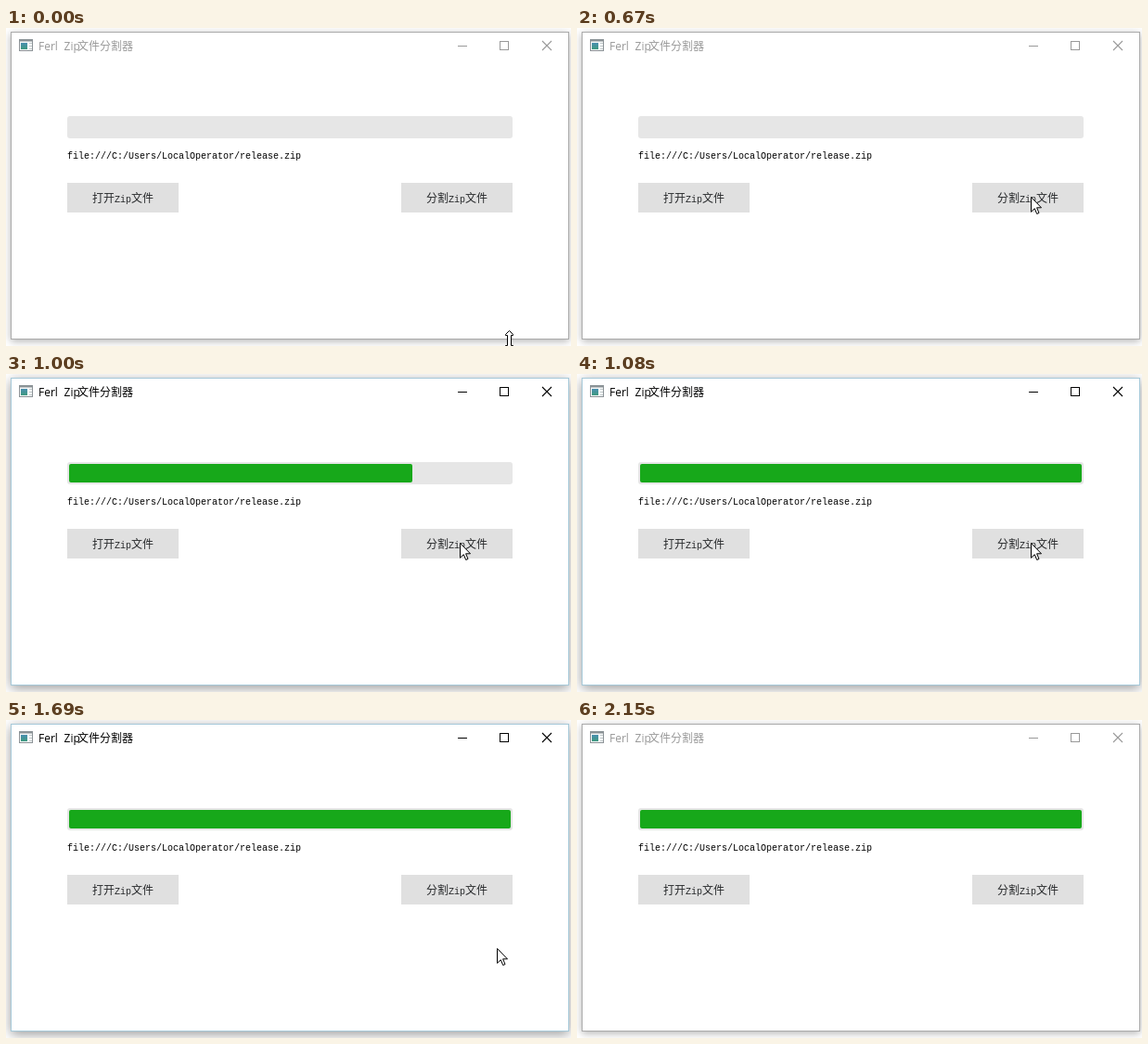
Animation of 609 by 343 pixels, one loop 2.23 s. Source, as an HTML page:

```html
<!DOCTYPE html>
<html lang="zh-CN">
<head>
<meta charset="utf-8">
<title>Zip文件分割器</title>
<style>
  html, body { margin: 0; width: 100%; height: 100%; overflow: hidden; background: #fff; }
  #window {
    position: absolute; left: 5px; top: 4px; width: 602px; height: 332px;
    box-sizing: border-box; border: 1px solid #aaa; background: #fff;
  }
  svg { position: absolute; left: 0; top: 0; width: 609px; height: 343px; color: #999; }
  text { white-space: pre; }
  .title { font: 12px "Open Sans", "Noto Sans CJK SC", "Noto Sans CJK", sans-serif; fill: currentColor; }
  .mono { font: 10px "Liberation Mono", monospace; fill: #000; }
  .label { font: 12px "Noto Sans CJK SC", "Noto Sans CJK", sans-serif; fill: #26282a; }
  .label .mono { fill: #26282a; }
  .controls { fill: none; stroke: currentColor; }
  .pointer { fill: #fff; stroke: #000; }
</style>
</head>
<body>
<div id="window"></div>
<svg id="content" viewBox="0 0 609 343">
  <defs>
    <linearGradient id="teal" x2="0" y2="1">
      <stop stop-color="#4a8fb0"/><stop offset="1" stop-color="#3f9a80"/>
    </linearGradient>
  </defs>

  <g id="icon">
    <rect x="14.5" y="12.5" width="14" height="12" fill="#f6f8f8" stroke="#8b9296"/>
    <path d="M14 13.5H29" stroke="#8b9296" stroke-width="2"/>
    <rect x="16" y="16" width="7" height="7" fill="url(#teal)"/>
    <path d="M25 16.5H28M25 19.5H28M25 22.5H28" stroke="#c3cacc"/>
  </g>
  <text class="title" y="24"><tspan x="35">Ferl</tspan><tspan x="59.5"> Zip</tspan><tspan x="77">文件分割器</tspan></text>
  <g class="controls">
    <path d="M487 19.5H497"/>
    <rect x="532.5" y="14.5" width="9" height="9"/>
    <path d="M578 14L588 24M588 14L578 24" stroke-width="1.1"/>
  </g>

  <rect x="66" y="95" width="480" height="24" rx="3" fill="#e6e6e6"/>
  <rect id="bar" x="68" y="97" width="0" height="20" rx="2" fill="#17a81a"/>
  <text class="mono" x="66" y="141">file:///C:/Users/LocalOperator/release.zip</text>

  <rect x="66" y="167" width="120" height="32" fill="#e0e0e0"/>
  <text class="label" y="187.5"><tspan x="93">打开</tspan><tspan class="mono" x="117">Zip</tspan><tspan x="135">文件</tspan></text>
  <rect x="426" y="167" width="120" height="32" fill="#e0e0e0"/>
  <text class="label" y="187.5"><tspan x="453">分割</tspan><tspan class="mono" x="477">Zip</tspan><tspan x="495">文件</tspan></text>

  <path id="resize" class="pointer"
    d="M542.5 326.5L546.5 330.5V331.5H544.5V342.5H546.5V343.5L542.5 347.5L538.5 343.5V342.5H540.5V331.5H538.5V330.5Z"/>
  <path id="arrow" class="pointer" opacity="0"
    d="M.5 .5V16.3L4.3 12.7L6.7 18.5L9 17.5L6.6 11.8H11.5Z"/>
</svg>
<script>
const LOOP = 2230;
const byId = id => document.getElementById(id);

// Plays [time, style] rows as hard steps, each held until the next.
function play(id, rows) {
  const frames = rows.map(([time, style]) => ({
    ...style, offset: time / LOOP, easing: 'steps(1, end)'
  }));
  frames.push({ ...rows[rows.length - 1][1], offset: 1 });
  byId(id).animate(frames, { duration: LOOP, iterations: Infinity });
}

const idle = { borderColor: '#aaaaaa', boxShadow: '0 2px 8px rgba(0,0,0,.3)' };
const active = { borderColor: '#a5c8d8', boxShadow: '0 3px 12px rgba(0,0,0,.4)' };
play('window', [[0, idle], [840, active], [2150, idle]]);
play('content', [[0, { color: '#999999' }], [840, { color: '#000000' }], [2150, { color: '#999999' }]]);
play('bar', [[0, 0], [910, 185], [1000, 370], [1080, 476]]
  .map(([time, width]) => [time, { width: width + 'px' }]));

const at = (time, x, y) => [time, { opacity: 1, transform: `translate(${x}px, ${y}px)` }];
const hidden = time => [time, { opacity: 0, transform: 'translate(0px, 0px)' }];
play('resize', [[0, { opacity: 1 }], [70, { opacity: 0 }]]);
play('arrow', [
  hidden(0),
  at(70, 535, 302), at(150, 524, 266), at(220, 512, 232), at(290, 502, 208),
  at(360, 497, 194), at(440, 493, 187), at(520, 491, 184), at(600, 490, 183), at(670, 489, 182),
  at(1460, 490, 187), at(1540, 495, 197), at(1610, 509, 218),
  at(1690, 529, 246), at(1770, 554, 277), at(1840, 581, 312),
  hidden(1920)
]);
</script>
</body>
</html>
```
